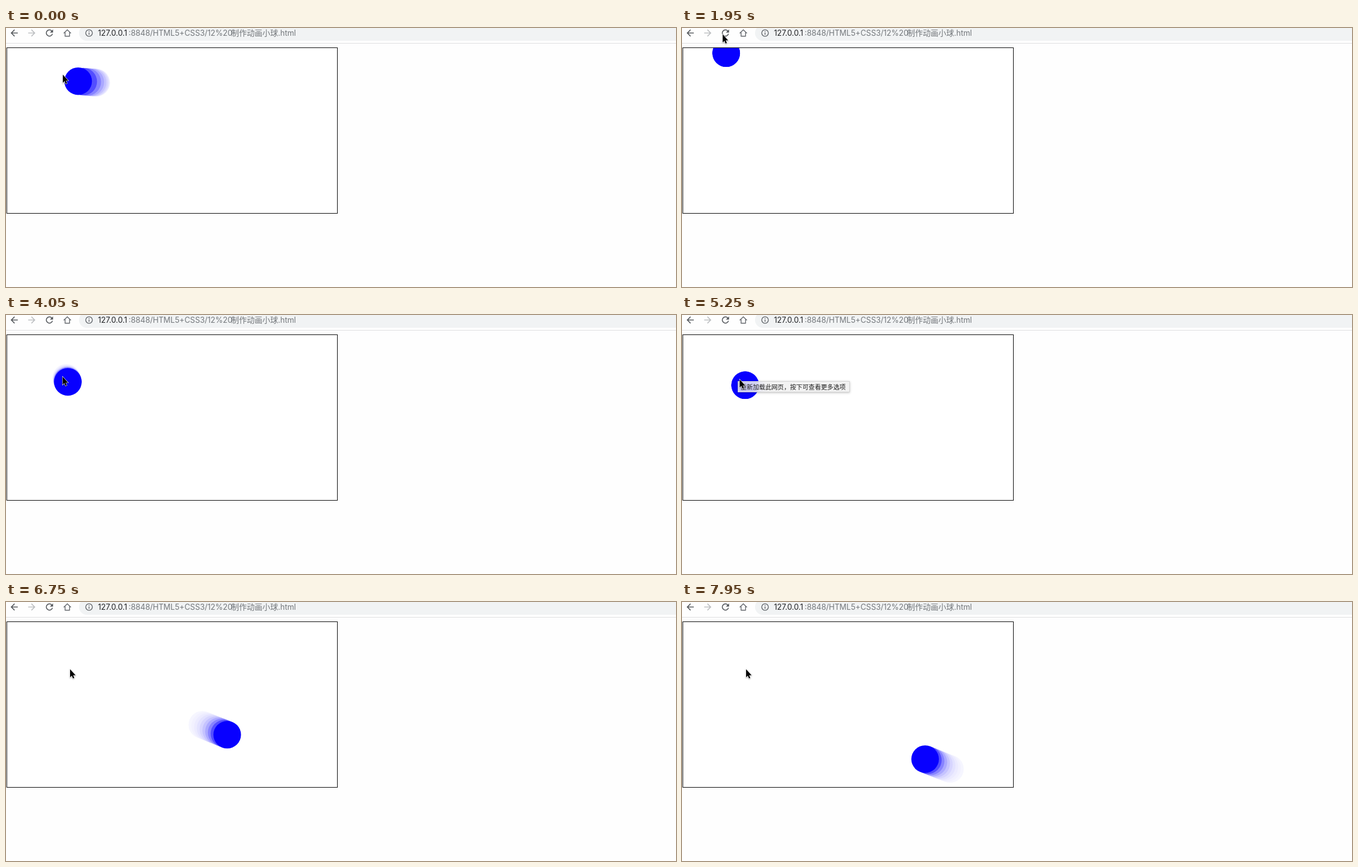
Recreate the animation shown at these times as an HTML page with a canvas. Size 1202 by 466 pixels, loop 8000 ms.

```html
<!DOCTYPE html>
<html lang="zh">
<head>
<meta charset="utf-8">
<title>小球</title>
<style>
  html, body { margin: 0; width: 100%; height: 100%; overflow: hidden; background: #fefefe; }
  body { position: relative; }
  svg, canvas, #tip { position: absolute; left: 0; top: 0; }
  canvas { left: 2px; top: 36px; }
  .url { font: 13.8px Inter, "Noto Sans CJK SC", "Noto Sans CJK", sans-serif; fill: #73777b; }
  .url .host { fill: #202124; }
  .url .cjk { font-size: 14px; }
  #tip {
    left: 100px; top: 119px; box-sizing: border-box; height: 20px; padding: 0 6px 0 4px;
    border: 1px solid #d4d4d4; background: rgba(240, 240, 240, .85); backdrop-filter: blur(10px);
    box-shadow: 0 1px 4px rgba(0, 0, 0, .25); color: #1c1c1c; white-space: nowrap;
    font: 11.1px/18px "Noto Sans CJK SC", "Noto Sans CJK", sans-serif; opacity: 0;
  }
  #mouse { filter: drop-shadow(0 1px 1px rgba(0, 0, 0, .35)); }
</style>
</head>
<body>
<svg width="1202" height="466" viewBox="0 0 1202 466">
  <defs><path id="arrow" d="M20 11H7.83l5.59-5.59L12 4l-8 8 8 8 1.41-1.41L7.83 13H20z"/></defs>
  <rect x="131" y="-5" width="1100" height="28" rx="14" fill="#f1f3f4"/>
  <path d="M0 27.5H1202" stroke="#dcdddf"/>
  <circle id="press" cx="78" cy="9" r="14" opacity="0"/>
  <g fill="#53575b">
    <use href="#arrow" transform="translate(5.2 -.6) scale(.8)"/>
    <use href="#arrow" transform="translate(55.8 -.6) scale(-.8 .8)" fill="#bcbec1"/>
    <path transform="translate(68.4 -.6) scale(.8)" d="M17.65 6.35A8 8 0 1 0 19.73 14h-2.08A6 6 0 1 1 16.22 7.78L13 11h7V4z"/>
  </g>
  <g fill="none" stroke="#5f6368" stroke-width="1.4">
    <path d="M103.5 9.6L110 3.2l6.500 6.400M106 8v6.800h8V8"/>
    <circle cx="149" cy="9" r="5.9"/>
    <path d="M149 8.2v4M149 5.6v1.4"/>
  </g>
  <text class="url" y="14"><tspan class="host" x="165">127.0.0.1</tspan><tspan x="220">:8848/HTML5+CSS3/12%20</tspan><tspan class="cjk" x="404">制作动画小球</tspan><tspan x="488">.html</tspan></text>
  <rect x="1.5" y="35.5" width="593" height="298" fill="none" stroke="#000"/>
</svg>
<canvas id="box" width="592" height="297"></canvas>
<div id="tip">重新加载此网页，按下可查看更多选项</div>
<svg width="1202" height="466" viewBox="0 0 1202 466">
  <path id="mouse" d="M0-1v14.500l3.100-2.900 2.100 4.800 2.300-1-2.100-4.700h4.400z" stroke="#fff" stroke-width="1.2" paint-order="stroke"/>
</svg>
<script>
  const LOOP = 8000, STEP = 150, TICK = 1000 / 60;
  const LEAVE = 900, RELOAD = 2550, LAUNCH = 6300 - 28 * TICK;
  const LAG = 25, TRAIL = 9, RADIUS = 24.75;
  const TOP = 36, RIGHT = 594.7, BOTTOM = 332;
  const HOME = [100.5, 135.3];

  const linear = u => u;
  const speedUp = u => u ** 3;
  const slowDown = u => 1 - (1 - u) ** 3;
  const clamp = u => Math.max(0, Math.min(1, u));

  // Pointer journey: each move eases from wherever the last one ended
  const start = [152, 89];
  const moves = [
    { from: -185, to: 0, end: [102, 85], ease: speedUp },
    { from: 0, to: LEAVE, end: [69.5, TOP], ease: slowDown },
    { from: LEAVE, to: 1050, end: [70, 21.5], ease: linear },
    { from: 1050, to: 1500, end: [71.5, 15], ease: linear },
    { from: 1650, to: 1950, end: [73, 12.5], ease: linear },
    { from: 3560, to: 3600, end: [88, 77], ease: linear },
    { from: 3600, to: 4500, end: [103.5, 117], ease: slowDown },
    { from: 5250, to: 5700, end: [115, 122], ease: linear }
  ];

  const $ = id => document.getElementById(id);
  const ctx = $('box').getContext('2d');
  const mouse = $('mouse'), tip = $('tip'), press = $('press');

  function mouseAt(t) {
    let [x, y] = start;
    for (const { from, to, end, ease } of moves) {
      const f = ease(clamp((t - from) / (to - from)));
      x += (end[0] - x) * f;
      y += (end[1] - y) * f;
    }
    return [x, y];
  }

  const bounce = (v, edge) => v > edge ? 2 * edge - v : v;

  // The ball trails the pointer inside the box, then flies off on its own
  function ballAt(t) {
    if (t >= LAUNCH) {
      const n = (t - LAUNCH) / TICK;
      return [bounce(124.6 + 4.95 * n, RIGHT), bounce(129.9 + 1.98 * n, BOTTOM)];
    }
    const seen = t - LAG;
    const [x, y] = mouseAt(t < RELOAD ? Math.min(seen, LEAVE) : seen);
    return y < TOP ? HOME : [x + 9.8, y + 9.3];
  }

  function drawBall(t) {
    const { width, height } = ctx.canvas;
    ctx.clearRect(0, 0, width, height);
    for (let k = TRAIL; k >= 0; k--) {
      let past = t - k * TICK;
      if (t >= RELOAD) past = Math.max(past, RELOAD);
      const [x, y] = ballAt(past);
      ctx.fillStyle = 'rgba(254, 254, 254, .3)';
      ctx.fillRect(0, 0, width, height);
      ctx.fillStyle = '#0800ff';
      ctx.beginPath();
      ctx.arc(x - 2, y - TOP, RADIUS, 0, 2 * Math.PI);
      ctx.fill();
    }
  }

  function frame(now) {
    const t = Math.floor(now % LOOP / STEP) * STEP;
    drawBall(t);
    mouse.setAttribute('transform', `translate(${mouseAt(t)})`);
    tip.style.opacity = t < 4350 ? 0 : clamp((5600 - t) / 350);
    press.setAttribute('opacity', t === RELOAD ? .08 : 0);
    requestAnimationFrame(frame);
  }
  frame(performance.now());
</script>
</body>
</html>
```
